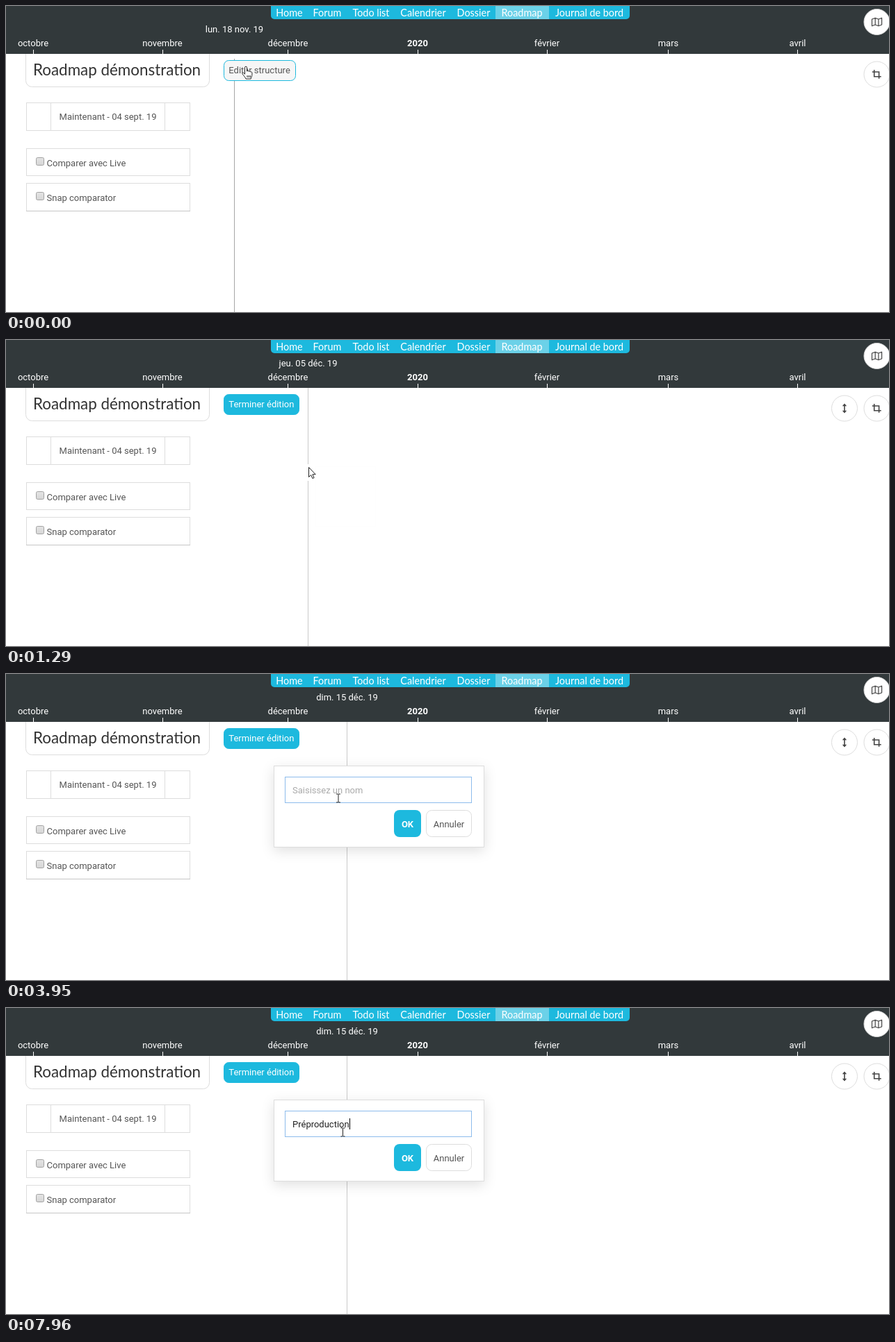
Write an HTML page that moves like this. It is 1270 px wide and 441 px high and loops after 7990 ms.

```html
<!DOCTYPE html>
<html lang="fr">
<head>
<meta charset="utf-8">
<title>Roadmap</title>
<style>
  html, body { margin: 0; width: 100%; height: 100%; overflow: hidden; background: #fff; }
  svg { display: block; width: 1270px; height: 441px; font: 13px Roboto, sans-serif; fill: #555; }
  .mid { text-anchor: middle; }
  .light { fill: #fff; }
  .round { font: 14.4px Lato, sans-serif; }
  .title { font: 22.4px Lato, sans-serif; fill: #333; }
  .box { fill: #fff; stroke: #ddd; }
  .icon { fill: none; stroke: #444; }
  .cyan { fill: #1db9de; }
  .shadow { filter: drop-shadow(0 5px 9px rgba(0, 0, 0, .12)); }
  #cursor path { fill: #fff; stroke: #222; stroke-linejoin: round; }
</style>
</head>
<body>
<svg viewBox="0 0 1270 441">
  <defs>
    <linearGradient id="check" x2="0" y2="1">
      <stop stop-color="#e4e4e4"/><stop offset="1" stop-color="#d6d6d6"/>
    </linearGradient>
  </defs>

  <path class="box" d="M28.5 60V107.500a9 9 0 0 0 9 9H283.500a9 9 0 0 0 9-9V60"/>
  <text class="title" x="39" y="100">Roadmap démonstration</text>

  <rect class="box" x="29.5" y="139.500" width="235" height="40"/>
  <path class="box" d="M64.5 140V179M228.500 140V179"/>
  <text class="mid" x="146.500" y="164">Maintenant - 04 sept. 19</text>

  <rect class="box" x="29.5" y="205.500" width="235" height="39"/>
  <rect class="box" x="29.5" y="255.500" width="235" height="40"/>
  <path d="M29 295.500H265" stroke="#c6c6c6"/>
  <g fill="url(#check)" stroke="#a2a2a2">
    <rect x="43.5" y="218.500" width="11" height="11" rx="2"/>
    <rect x="43.5" y="268.500" width="11" height="11" rx="2"/>
  </g>
  <text x="58.5" y="231">Comparer avec Live</text>
  <text x="58.5" y="281">Snap comparator</text>

  <path id="line" fill="none"/>

  <rect id="button" x="313.500" y="78.5" height="29" rx="7" stroke="#1db9de"/>
  <text id="label" x="320.300" y="97"></text>

  <rect width="1270" height="69" fill="#32393b"/>
  <g id="months" class="mid light"></g>
  <text id="date" class="mid light" y="38"></text>
  <path class="cyan" d="M381 0H897V14a5 5 0 0 1-5 5H386a5 5 0 0 1-5-5Z"/>
  <rect x="704" width="77" height="19" fill="#6bd1e8"/>
  <g id="nav" class="mid light round"></g>

  <circle class="box" cx="1252.500" cy="23" r="18.5"/>
  <path class="icon" stroke-width="1.2" stroke-linejoin="round"
    d="M1245.500 19l4.700-1.800 4.700 1.800 4.700-1.800v9.800l-4.700 1.800-4.700-1.800-4.700 1.800zM1250.200 17.200v9.800M1254.900 19v9.800"/>
  <circle class="box" cx="1252.500" cy="98.5" r="18.5"/>
  <path class="icon" stroke-width="1.6" d="M1248.700 92v9.800h10M1245.800 95h9.800v9.800"/>
  <g id="resize">
    <circle class="box" cx="1206" cy="98.5" r="18.5"/>
    <path fill="#444" d="M1206 91.5l3.200 3.700h-2.400v6.600h2.400l-3.200 3.700-3.200-3.700h2.400v-6.600h-2.400z"/>
  </g>

  <rect id="menu" class="box" x="445.500" y="182.500" width="86" height="86"/>

  <g id="dialog">
    <rect class="box shadow" x="385.500" y="132.500" width="302" height="117"/>
    <rect x="401.500" y="148.500" width="268" height="37" fill="#fff" stroke="#8dbcec"/>
    <text id="hint" x="412" y="172" fill="#aaa">Saisissez un nom</text>
    <text id="typed" x="412" y="172" fill="#222"></text>
    <rect id="caret" y="159" width="1" height="16" fill="#000"/>
    <rect class="cyan" x="558" y="196" width="39" height="39" rx="8"/>
    <text class="mid light" x="577.500" y="220.500" font-weight="700">OK</text>
    <rect class="box" x="604.500" y="196.500" width="65" height="38" rx="8"/>
    <text class="mid" x="637" y="220.500">Annuler</text>
  </g>

  <g id="cursor">
    <path id="arrow" d="M.5.5V14.500l3.200-3 2.200 5 2.200-1-2.200-4.800h4.300z"/>
    <path id="hand" d="M-1.500 1.700a1.500 1.500 0 0 1 3 0V7c.5-1 2.500-.8 2.700.4.700-.8 2.300-.5 2.500.7.800-.6 2.200-.1 2.200 1.200v3c0 2-1.500 3.200-1.700 5.700H0c-.6-2.200-3.200-4.500-5-7.300-.7-1.600 1.200-2.300 2.200-1l1.300 1.600zM2 13v3M4.200 13v3M6.300 13v3"/>
    <path id="beam" style="fill:none" d="M-3-6h2.200l.8.600.8-.6h2.200M0-5.400V5.400M-3 6h2.200l.8-.6.8.600h2.200"/>
  </g>
</svg>
<script>
const LOOP = 7990, BLINK = 515;
const $ = id => document.getElementById(id);
const clamp = v => Math.max(0, Math.min(1, v));
const ramp = (t, a, b) => clamp((t - a) / (b - a));
const show = (el, on) => el.setAttribute('visibility', on ? 'visible' : 'hidden');
const set = (el, attrs) => { for (const k in attrs) el.setAttribute(k, attrs[k]); };
const mix = (a, b, k) => `rgb(${a.map((v, i) => Math.round(v + (b[i] - v) * k))})`;

// time, x, y of the pointer's hot spot
const PATH = [
  [0, 345, 87], [200, 345, 87], [350, 365, 109], [510, 405, 149], [700, 428, 174],
  [890, 434, 182], [920, 435, 183], [1640, 435, 183], [1850, 490.500, 198],
  [2600, 490.500, 198], [2760, 479, 187], [2910, 479, 187], [3040, 478, 179],
  [7900, 478, 179], [7960, 484.500, 179], [LOOP, 484.500, 179]
];
const WORD = 'Préproduction';
const KEYS = [4290, 4630, 4750, 5460, 5650, 5740, 6110, 6260, 6380, 6590, 6650, 6790, 6910];
const DAYS = ['dim', 'lun', 'mar', 'mer', 'jeu', 'ven', 'sam'];

const MONTHS = [['octobre', 39], ['novembre', 225], ['décembre', 405.5], ['2020', 592],
  ['février', 778], ['mars', 952.5], ['avril', 1138.5]];
const NAV = [['Home', 407.5], ['Forum', 462], ['Todo list', 525], ['Calendrier', 600],
  ['Dossier', 672.5], ['Roadmap', 742], ['Journal de bord', 839]];

$('months').innerHTML = MONTHS.map(([name, x]) =>
  `<text x="${x}" y="58" ${name === '2020' ? 'font-weight="700"' : ''}>${name}</text>
   <rect x="${Math.floor(x)}" y="63" width="1" height="6"/>`).join('');
$('nav').innerHTML = NAV.map(([name, x]) => `<text x="${x}" y="14.5">${name}</text>`).join('');

function pointer(t) {
  const i = Math.max(1, PATH.findIndex(p => p[0] > t));
  const [a, b] = [PATH[i - 1], PATH[i]];
  const k = ramp(t, a[0], b[0]);
  return [a[1] + (b[1] - a[1]) * k, a[2] + (b[2] - a[2]) * k];
}

function dateAt(x) {
  const d = new Date(Date.UTC(2019, 10, 1 + Math.floor((x - 225) / 6.02)));
  const day = String(d.getUTCDate()).padStart(2, '0');
  return `${DAYS[d.getUTCDay()]}. ${day} ${d.getUTCMonth() === 10 ? 'nov' : 'déc'}. 19`;
}

function drawLine(x, y, t) {
  const onButton = t < 350;
  const lineX = onButton ? 328.5 : t > 1850 ? 490.5 : Math.round(x) - 0.5;
  const top = onButton ? 76 : 69;
  const d = t < 2700
    ? `M${lineX} ${top}V${Math.round(y) - 4}M${lineX} ${Math.round(y) + 20}V441`
    : `M${lineX} ${top}V441`;
  set($('line'), { d, stroke: onButton ? '#a6a6a6' : '#cacaca' });
  set($('date'), { x: lineX });
  $('date').textContent = dateAt(lineX);
}

function drawButton(t) {
  const editing = t >= 330, k = ramp(t, 330, 640);
  set($('button'), { width: editing ? 108 : 103, fill: mix([246, 246, 246], [29, 185, 222], k) });
  set($('label'), { fill: mix([85, 85, 85], [255, 255, 255], k) });
  $('label').textContent = editing ? 'Terminer édition' : 'Editer structure';
  show($('resize'), editing);
}

function drawDialog(t) {
  const count = KEYS.filter(k => k <= t).length;
  const lastKey = count ? KEYS[count - 1] : 2400;
  set($('dialog'), { opacity: ramp(t, 2540, 2760) });
  show($('hint'), !count);
  $('typed').textContent = WORD.slice(0, count);
  const width = count ? $('typed').getComputedTextLength() : 0;
  set($('caret'), { x: Math.round(412 + width) });
  show($('caret'), (t - lastKey) % (2 * BLINK) < BLINK);
}

function draw(t) {
  const [x, y] = pointer(t);
  drawLine(x, y, t);
  drawButton(t);
  set($('menu'), { opacity: ramp(t, 1290, 1430) * (1 - ramp(t, 2270, 2400)) });
  drawDialog(t);
  const kind = t >= 2740 ? 'beam' : t < 350 || (t >= 2000 && t < 2400) ? 'hand' : 'arrow';
  for (const id of ['arrow', 'hand', 'beam']) show($(id), id === kind);
  set($('cursor'), { transform: `translate(${x} ${y})` });
}

const start = performance.now();
function tick() {
  draw((performance.now() - start) % LOOP);
  requestAnimationFrame(tick);
}
tick();
</script>
</body>
</html>
```
